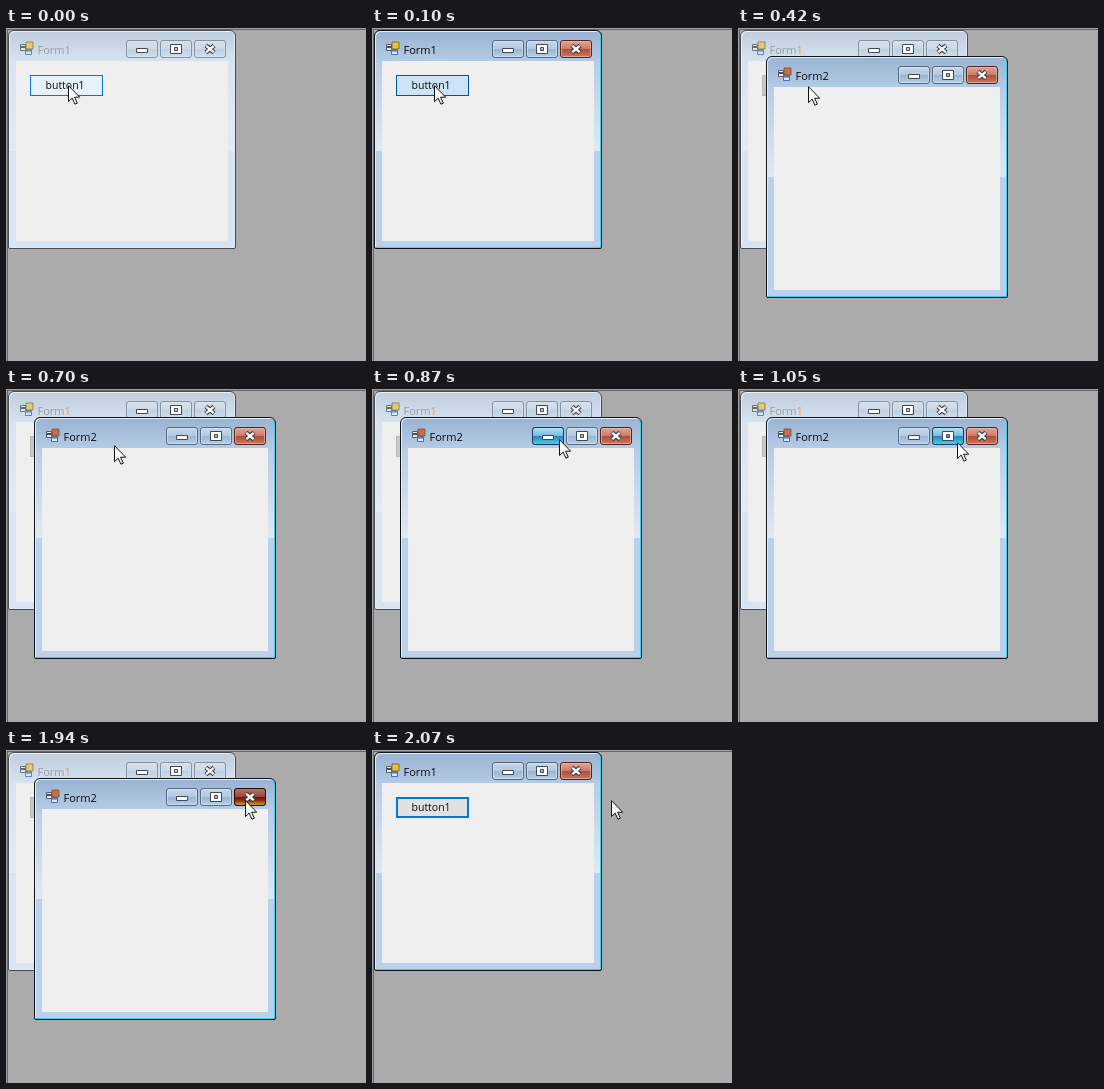
Write an HTML page that moves like this. It is 360x333 px and loops after 2.35 s.

```html
<!DOCTYPE html>
<html lang="en">
<head>
<meta charset="utf-8">
<title>Modal form demo</title>
<style>
html, body { margin: 0; width: 100%; height: 100%; overflow: hidden; background: #ababab; }
div, span, b { box-sizing: border-box; }
svg { position: absolute; overflow: visible; }
text { font-family: "Open Sans", "Noto Sans", sans-serif; }

.stage {
  position: absolute; left: 0; top: 0; width: 360px; height: 333px; overflow: hidden;
  background: #ababab; box-shadow: inset 1px 1px #a0a0a0, inset 2px 2px #696969;
}
.stage, .stage * { animation: 2350ms step-end infinite; }

/* windows */
.win {
  position: absolute; border: 1px solid #0d1218; border-radius: 6px 6px 2px 2px;
  background:
    linear-gradient(#98b3d2, #b4cbe5) 0 0 / 100% 30px no-repeat,
    linear-gradient(#b6cce6, #dfe9f5) 0 30px / 100% 90px no-repeat,
    #b9d1ea;
  box-shadow: inset 1px 1px #e4eef9, inset -1px -1px #45cdf0;
}
.win.idle {
  border-color: #474c52;
  background:
    linear-gradient(#bfcddd, #d6e3f1) 0 0 / 100% 30px no-repeat,
    linear-gradient(#d6e3f1, #e3ebf4) 0 30px / 100% 90px no-repeat,
    #d7e4f2;
  box-shadow: inset 1px 1px #e9f0f7, inset -1px -1px #dfe9f3;
}
.form1 { left: 2px; top: 2px; width: 228px; height: 219px; }
.form2 { left: 28px; top: 28px; width: 242px; height: 242px; animation-name: open; }
.front { animation-name: front; }
.client { position: absolute; inset: 30px 7px 7px; background: #efefef; }
.head { left: -1px; top: -1px; width: 100px; height: 30px; }
.head text { font-size: 11px; fill: #0a0a0a; }
.idle .head text { fill: #969ca3; }
.idle .head use { opacity: .8; }
.idle tspan { animation-name: ghost; }

/* caption buttons */
.caps { position: absolute; right: 9px; top: 9px; display: flex; gap: 2px; }
.caps span, .caps b { border: 1px solid #566a83; border-radius: 3px; }
.caps span {
  position: relative; width: 32px; height: 18px;
  background: linear-gradient(#c6d7ea, #b3c9e1 48%, #98b3d1 50%, #b6cfe9);
  box-shadow: inset 0 0 0 1px #d9e6f3a0;
}
.caps .x {
  border-color: #5b2018;
  background: linear-gradient(#e0a594, #cd7a68 48%, #b04a32 50%, #ca7860);
  box-shadow: inset 0 0 0 1px #eec0b0a0;
}
.idle .caps span {
  border-color: #8391a1;
  background: linear-gradient(#d5e0eb, #cbd8e6 48%, #bfcfdf 50%, #d0deec);
}
.caps b { position: absolute; inset: -1px; opacity: 0; border-color: #133f5c; }
.caps svg { left: -1px; top: -1px; width: 32px; height: 18px; }
.hot { background: linear-gradient(#b4dcf3, #7bbbe2 48%, #2482ba 50%, #4ccdf0); }
.caps .xhot { border-color: #4a130a; background: linear-gradient(#f3b096, #e6765a 48%, #d02c0a 50%, #e0500f 70%, #fcc648); }
.caps .xdown { border-color: #2f0c06; background: linear-gradient(#b07a68, #96493a 48%, #6d1405 50%, #8a2c08 70%, #d29a34); }
.min { animation-name: min; }
.max { animation-name: max; }
.xhot { animation-name: xhot; }
.xdown { animation-name: xdown; }

/* form button and pointer */
.btn {
  position: absolute; left: 24px; top: 47px; width: 73px; height: 21px;
  box-shadow: inset 0 0 0 1px #0078d7; animation-name: btn;
}
.btn svg { left: 0; top: 0; width: 73px; height: 21px; }
.btn text { font-size: 10.5px; fill: #0a0a0a; }
.ptr { left: 0; top: 0; width: 13px; height: 20px; animation-name: move; }

@keyframes front { 0% { opacity: 0 } 4.255% { opacity: 1 } 10.212% { opacity: 0 } 88.085%, 100% { opacity: 1 } }
@keyframes ghost { 0% { fill: #969ca3 } 10.212%, 100% { fill: #e39a62 } }
@keyframes btn {
  0% { background: #e5f1fb; box-shadow: inset 0 0 0 1px #0078d7 }
  4.255% { background: #cce4f7; box-shadow: inset 0 0 0 1px #005499 }
  10.212% { background: #c8c8c8; box-shadow: inset 0 0 0 1px #bababa }
  88.085%, 100% { background: #e1e1e1; box-shadow: inset 0 0 0 2px #0078d7 }
}
@keyframes open {
  0% { opacity: 0; transform: none }
  10.212% { opacity: .2; transform: scale(.92) }
  12.127% { opacity: .5; transform: scale(.95) }
  14.042% { opacity: .75; transform: scale(.975) }
  15.957% { opacity: .92; transform: scale(.99) }
  17.872% { opacity: 1; transform: none }
  88.085%, 100% { opacity: 0; transform: none }
}
@keyframes min { 0% { opacity: 0 } 35.106% { opacity: 1 } 39.148%, 100% { opacity: 0 } }
@keyframes max { 0% { opacity: 0 } 39.148% { opacity: 1 } 46.808%, 100% { opacity: 0 } }
@keyframes xhot { 0% { opacity: 0 } 46.808% { opacity: 1 } 82.553%, 100% { opacity: 0 } }
@keyframes xdown { 0% { opacity: 0 } 82.553% { opacity: 1 } 88.085%, 100% { opacity: 0 } }
@keyframes move {
  0% { transform: translate(62px, 57px) }
  14.042% { transform: translate(65px, 57px) }
  15.957% { transform: translate(68px, 58px) }
  17.872% { transform: translate(70px, 58px) }
  25.531% { transform: translate(75px, 58px) }
  27.446% { transform: translate(88px, 57px) }
  29.361% { transform: translate(108px, 56px) }
  31.276% { transform: translate(130px, 55px) }
  33.191% { transform: translate(152px, 53px) }
  35.106% { transform: translate(172px, 51px) }
  37.021% { transform: translate(187px, 50px) }
  39.148% { transform: translate(200px, 51px) }
  41.063% { transform: translate(210px, 52px) }
  42.978% { transform: translate(219px, 53px) }
  44.893% { transform: translate(226px, 54px) }
  46.808% { transform: translate(232px, 54px) }
  48.936% { transform: translate(235px, 53px) }
  51.489% { transform: translate(237px, 52px) }
  54.042% { transform: translate(238px, 51px) }
  56.595%, 100% { transform: translate(239px, 50px) }
}
</style>
</head>
<body>
<svg width="0" height="0">
  <defs>
    <g id="icon">
      <path d="M18 12h7v7h-7z" fill="currentColor" stroke="#6b5a3a" stroke-width=".8"/>
      <path d="M12.5 14.5h5v6h-5z" fill="#e8ebee" stroke="#555c66"/>
      <path d="M13 16h4v2h-4z" fill="#4b4f58"/>
      <path d="M17.5 19.5h6v5h-6z" fill="#dfe8f4" stroke="#4a6ea8"/>
      <path d="M18 20h5v1.6h-5z" fill="#4f83c8"/>
    </g>
    <path id="g-min" d="M10.5 8.5h11v4h-11z" fill="#fff" stroke="#3f4854" stroke-linejoin="round"/>
    <path id="g-max" d="M10.5 4.5h11v9h-11zM14.5 7.5v3h3v-3z" fill="#fff" stroke="#3f4854" fill-rule="evenodd" stroke-linejoin="round"/>
    <g id="g-x" fill="none">
      <path d="M12 5.5l8 7m0-7l-8 7" stroke="#3f4048" stroke-width="4.4"/>
      <path d="M12.3 5.8l7.4 6.4m0-6.4l-7.4 6.4" stroke="#fff" stroke-width="2.3"/>
    </g>
  </defs>
</svg>

<div class="stage">
  <div class="win idle form1">
    <svg class="head" color="#f0c94a"><use href="#icon"/><text x="29.5" y="24">Form<tspan>1</tspan></text></svg>
    <div class="caps">
      <span><svg><use href="#g-min"/></svg></span>
      <span><svg><use href="#g-max"/></svg></span>
      <span><svg><use href="#g-x"/></svg></span>
    </div>
    <div class="client"></div>
  </div>

  <div class="win form1 front">
    <svg class="head" color="#f0c030"><use href="#icon"/><text x="29.5" y="24">Form1</text></svg>
    <div class="caps">
      <span><svg><use href="#g-min"/></svg></span>
      <span><svg><use href="#g-max"/></svg></span>
      <span class="x"><svg><use href="#g-x"/></svg></span>
    </div>
    <div class="client"></div>
  </div>

  <div class="btn"><svg><text x="15.5" y="14">button1</text></svg></div>

  <div class="win form2">
    <svg class="head" color="#cf6a4a"><use href="#icon"/><text x="29.5" y="24">Form2</text></svg>
    <div class="caps">
      <span><b class="hot min"></b><svg><use href="#g-min"/></svg></span>
      <span><b class="hot max"></b><svg><use href="#g-max"/></svg></span>
      <span class="x"><b class="xhot"></b><b class="xdown"></b><svg><use href="#g-x"/></svg></span>
    </div>
    <div class="client"></div>
  </div>

  <svg class="ptr">
    <path d="M.5.7V16.6L4.2 13.1 6.9 19.2 9.3 18.2 6.6 12.2H11.7Z" fill="#fff" stroke="#111"/>
  </svg>
</div>
</body>
</html>
```
